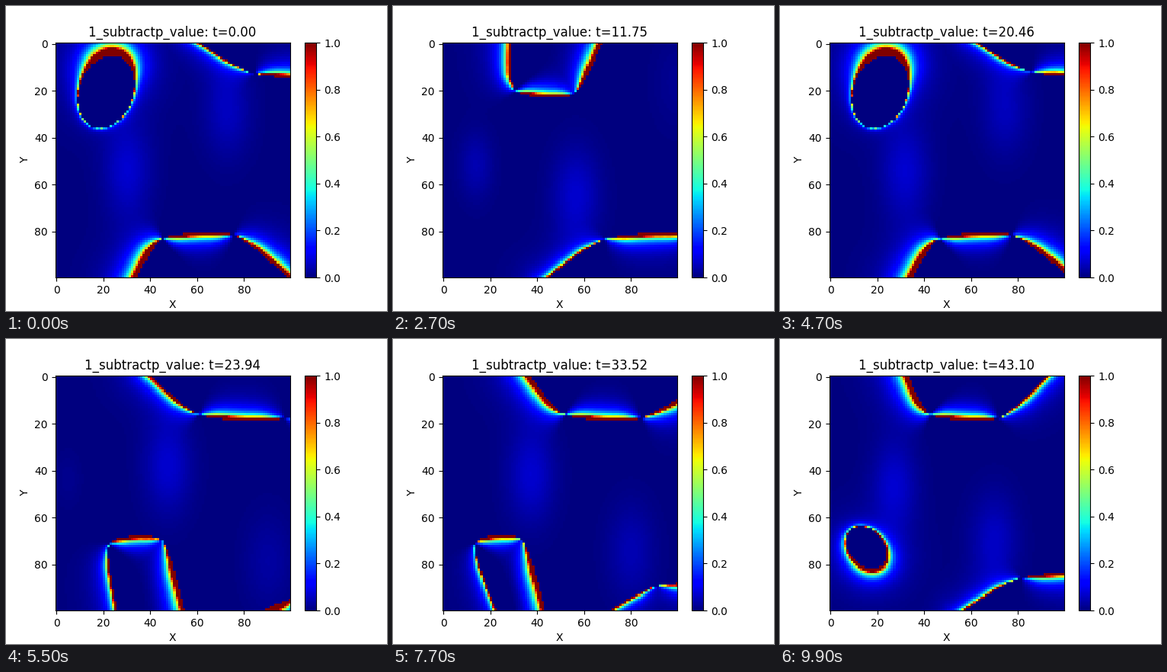
These frames come from a looping animation (500x400 px, 10 s). A matplotlib script:

```python
import numpy as np
import matplotlib.pyplot as plt
from matplotlib.animation import FuncAnimation
from matplotlib.path import Path

N = 100
FRAMES = 100
DT = 43.10 / 99
RATE = 0.0855  # shedding cycles per frame
BIRTH, OPENING, EXIT = 0.36, 0.53, 1.95  # vortex ages, in cycles

axis = np.arange(N, dtype=np.float32)
X, H = np.meshgrid(axis, axis)
CELLS = np.column_stack([X.ravel(), H.ravel()])


def ramp(v, start, end):
    return np.clip((v - start) / (end - start), 0, 1)


def bump(v, mid, width):
    return np.exp(-((v - mid) / width) ** 2)


def oval(age):
    """Newborn vortex: a leaning oval that swells toward the wall."""
    swell = ramp(age, BIRTH, 0.5) ** 6
    size = ramp(age, BIRTH, 0.4)
    a = np.linspace(0, 2 * np.pi, 120)
    up = np.sin(a)
    x = 14 + 7 * swell + size * ((7.6 + 4.2 * swell) * np.cos(a) - 2.5 * up)
    h = 27.5 - 7 * swell + size * (7.5 + 8 * swell) * up
    wallward = (1 - up) / 2
    error = (0.25 + 0.9 * wallward) * (1 - 0.6 * swell) + 4 * swell * wallward ** 6
    return x, h, size * error


def arch(age):
    """Grown vortex: two sides standing on the wall, joined by a cap."""
    t = age - 1
    left = 34.5 + 30 * t + 130 * max(age - 1.2, 0) ** 2
    right = 97 + 180 * t + 120 * t ** 2
    top = 17.5 + 13 * ramp(age, 0.95, 0.7) ** 2 - 60 * max(age - 1.25, 0) ** 2
    top = max(top, 4)
    a, b = 43 + 78 * t, 76 + 100 * t

    # Carry both sides on past the wall, then round the corners.
    foot = 8 / top
    pts = np.array([[left + (left - a) * foot, -8, -foot],
                    [a, top, 1],
                    [b, top + 2, 2],
                    [right + (right - b) * foot, -8, 3 + foot]])
    for cut in (0.15, 0.25, 0.25):
        p, q = pts[:-1], pts[1:]
        mid = np.stack([p + cut * (q - p), q - cut * (q - p)], 1).reshape(-1, 3)
        pts = np.vstack([pts[:1], mid[1:-1], pts[-1:]])
    run = np.r_[0, np.cumsum(np.hypot(*np.diff(pts[:, :2], axis=0).T))]
    x, h, part = (np.interp(np.arange(0, run[-1], 0.8), run, c) for c in pts.T)

    # The error changes sign at both shoulders.
    rise = 0.6 + 2 * bump(age, 0.98, 0.2) - 4 * ramp(age, 1.55, 1.65)
    fall = 2 * np.tanh((age - 0.94) / 0.05)
    error = np.interp(part, [0, 0.6, 1, 1.25, 1.75, 2, 2.5, 3],
                      [rise, rise, 0, -1.3, -1.3, 0, fall, fall])
    return x, h, error


def halo(age):
    """Faint patch travelling with the vortex, off the wall."""
    amp = 0.07 * ramp(age, 0.65, 0.9) * ramp(age, EXIT, 1.4)
    grow = 0.4 + 0.6 * ramp(age, 0.6, 1)
    return (amp * bump(X, 30 + 85 * (age - 1), 10 * grow)
            * bump(H, 45 - 35 * (age - 1), 20 * grow))


def vortex(age):
    """Error and interior of one vortex, with its wall at row 0."""
    x, h, s = oval(age) if age < OPENING else arch(age)
    inside = Path(np.column_stack([x, h])).contains_points(CELLS).reshape(N, N)
    near = (h > -3) & (x < 115)
    if not near.any():
        return np.zeros((N, N)), inside
    x, h, s = (c[near].astype(np.float32) for c in (x, h, s))
    d2 = (((axis - x[:, None]) ** 2)[:, None, :]
          + ((axis - h[:, None]) ** 2)[:, :, None] + 0.04)
    weight = 1 / d2 ** 2
    error = np.tensordot(s, weight, 1) / weight.sum(0)
    dist = np.sqrt(d2.min(0))
    return np.where(inside, -error, error) / dist * np.exp(-dist / 10), inside


def field(i):
    value = np.zeros((N, N))
    glow = np.zeros((N, N))
    core = np.zeros((N, N), bool)
    for shift, flip in ((0, -1), (0.5, 1)):  # bottom wall, top wall
        young = (RATE * i + shift) % 1
        for age in (young, young + 1):
            if BIRTH < age < EXIT:
                v, inside = vortex(age)
                value = np.maximum(value, v[::flip])
                core |= inside[::flip]
                glow += halo(age)[::flip]
    return np.clip(value + np.where(core, 0, glow), 0, 1)


fig, ax = plt.subplots(figsize=(5, 4), dpi=100)
image = ax.imshow(np.zeros((N, N)), cmap="jet", vmin=0, vmax=1,
                  interpolation="nearest")
fig.colorbar(image, ax=ax)
ax.set_xlabel("X")
ax.set_ylabel("Y")
title = ax.set_title("")


def update(i):
    image.set_data(field(i))
    title.set_text(f"1_subtractp_value: t={i * DT:.2f}")
    return image, title


anim = FuncAnimation(fig, update, frames=FRAMES, interval=100,
                     init_func=lambda: update(0), repeat=True, repeat_delay=0)
plt.show()
```
